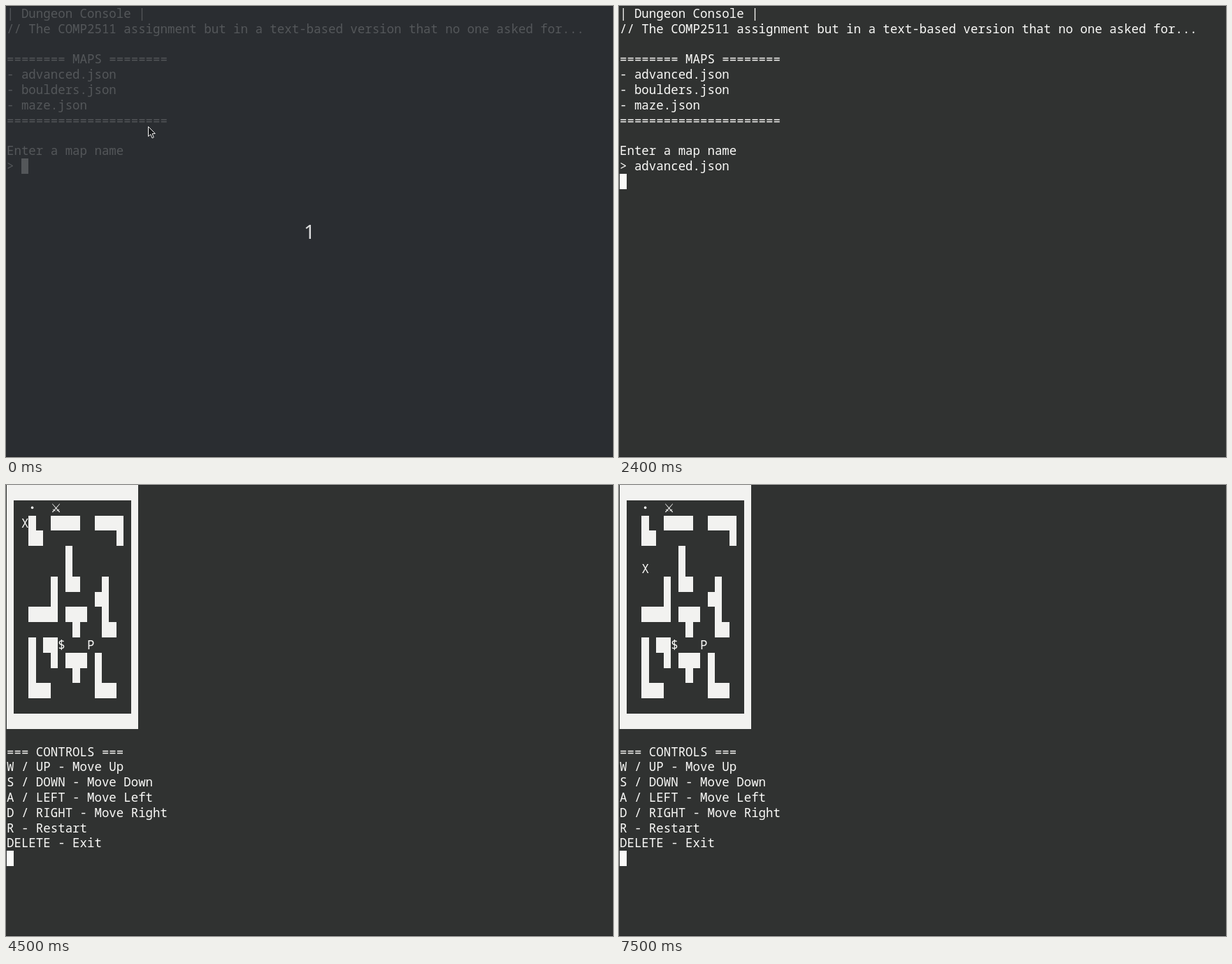
These frames come from a looping animation (868x645 px, 8000 ms). An HTML page with a canvas:

```html
<!DOCTYPE html>
<html lang="en">
<head>
<meta charset="utf-8">
<title>Dungeon Console</title>
<style>
html, body { margin: 0; width: 100%; height: 100%; overflow: hidden; background: #303231; }
canvas { display: block; }
</style>
</head>
<body>
<canvas id="stage" width="868" height="645"></canvas>
<script>
const canvas = document.getElementById('stage');
const ctx = canvas.getContext('2d');
const LOOP = 8000, TICK = 100;
const CW = 10.46, RH = 21.8, LEFT = 1;
const SIZE = CW / 0.6;
const MONO = `500 ${SIZE}px "Noto Sans Mono", "DejaVu Sans Mono", monospace`;

const MENU = `| Dungeon Console |
// The COMP2511 assignment but in a text-based version that no one asked for...

======== MAPS ========
- advanced.json
- boulders.json
- maze.json
======================

Enter a map name`.split('\n');

const CONTROLS = `=== CONTROLS ===
W / UP - Move Up
S / DOWN - Move Down
A / LEFT - Move Left
D / RIGHT - Move Right
R - Restart
DELETE - Exit`.split('\n');

const LOST = ['You lost :(', 'Press R to restart', 'or DELETE to exit'];

const MAP = `##################
#                #
#  #  ####  #### #
#  ##          # #
#       #        #
#       #        #
#     # ##   #   #
#     #     ##   #
#  #### ###  #   #
#        #   ##  #
#  # ##$   P     #
#  #  # ### #    #
#  #     #  #    #
#  ###      ###  #
#                #
##################`.split('\n');

// keystrokes, one slot per tick
const TYPED = 'a,d,,,,va,,n,ce,d,,.,,,js,,on'.split(',');
const KEYS = 'S.S.W..WD....D....A' + '.'.repeat(12) + 'R' + '.'.repeat(10) + 'DD';
const TYPE_AT = 500, ENTER_AT = 2400, GAME_AT = 2500, KEYS_AT = 3200;
const LOST_AT = 5500, RESTART_AT = KEYS_AT + KEYS.indexOf('R') * TICK;

// the cursor blinks off until the next key press
const BLINKS = [[2900, 3000], [4700, 4800], [5900, 6200], [6800, 7200]];

const STEP = { W: [0, -1], S: [0, 1], A: [-1, 0], D: [1, 0] };
const ticksSince = (start, t) => Math.max(0, Math.floor((t - start) / TICK) + 1);
const colX = c => LEFT + c * CW;

function cell(col, row, span = 1) {
  const x = Math.round(colX(col)), y = Math.round(row * RH);
  ctx.fillRect(x, y, Math.round(colX(col + span)) - x, Math.round((row + 1) * RH) - y);
}

function print(text, col, row, font = MONO) {
  ctx.font = font;
  ctx.fillText(text, colX(col), row * RH + 16.9);
}

function dot(col, row) {
  ctx.beginPath();
  ctx.arc(colX(col + 0.5), row * RH + 10.6, 1.8, 0, Math.PI * 2);
  ctx.fill();
}

function pointer(x, y) {
  const arrow = new Path2D('M.5 .5V14.5L3.8 11.6L6 16.8L8.3 15.8L6.1 10.7L10.3 10.4Z');
  ctx.save();
  ctx.translate(x, y);
  ctx.fillStyle = '#17191b';
  ctx.fill(arrow);
  ctx.strokeStyle = '#f2f2f2';
  ctx.stroke(arrow);
  ctx.restore();
}

// The enemy closes the column gap first, goes up if it cannot, and stops beside the player.
function chase(enemy, player) {
  const dx = Math.sign(player.x - enemy.x);
  const gap = Math.abs(player.x - enemy.x) + Math.abs(player.y - enemy.y);
  if (gap === 1) return;
  if (dx && MAP[enemy.y][enemy.x + dx] !== '#') enemy.x += dx;
  else enemy.y--;
}

function play(t) {
  let player, enemy;
  const reset = () => {
    player = { x: 1, y: 1 };
    enemy = { x: 3, y: 5 };
  };
  reset();
  for (const key of KEYS.slice(0, ticksSince(KEYS_AT, t))) {
    if (key === 'R') reset();
    if (!STEP[key]) continue;
    player.x += STEP[key][0];
    player.y += STEP[key][1];
    chase(enemy, player);
  }
  return { player, enemy };
}

function drawMenu(t, dim) {
  ctx.fillStyle = dim ? '#54575a' : '#fafaf8';
  MENU.forEach((line, i) => print(line, 0, i));
  const name = TYPED.slice(0, ticksSince(TYPE_AT, t)).join('');
  print('> ' + name, 0, 10);
  if (t < ENTER_AT) cell(name.length + 2, 10);
  else cell(0, 11);
  if (dim) {
    ctx.fillStyle = '#dedfdf';
    ctx.font = '28px "Noto Sans", sans-serif';
    ctx.textAlign = 'center';
    ctx.fillText('1', 434, 333);
    ctx.textAlign = 'left';
  }
  if (dim) pointer(203, 172);
  else if (t < 400) pointer(197, 166);
}

function drawGame(t) {
  ctx.fillStyle = '#f2f2f0';
  MAP.forEach((line, row) => {
    for (const wall of line.matchAll(/#+/g)) cell(wall.index, row, wall[0].length);
  });

  ctx.fillStyle = '#fafaf8';
  MAP.forEach((line, row) => {
    for (const item of line.matchAll(/[$P]/g)) print(item[0], item.index, row);
  });
  print('\u2694', 6, 1, `${SIZE}px "DejaVu Sans", sans-serif`);

  const { player, enemy } = play(t);
  dot(player.x, player.y);
  print('X', enemy.x, enemy.y);

  const lines = t >= LOST_AT && t < RESTART_AT ? LOST : CONTROLS;
  const top = MAP.length + 1;
  lines.forEach((line, i) => print(line, 0, top + i));
  if (!BLINKS.some(([off, on]) => t >= off && t < on)) cell(0, top + lines.length);
}

function frame() {
  const t = performance.now() % LOOP, dim = t < 200;
  const { width, height } = canvas;
  ctx.fillStyle = dim ? '#242629' : '#262828';
  ctx.fillRect(0, 0, width, height);
  ctx.fillStyle = dim ? '#2a2d31' : '#303231';
  ctx.fillRect(0, 1, width, height - 2);
  if (t < GAME_AT) drawMenu(t, dim);
  else drawGame(t);
  requestAnimationFrame(frame);
}
frame();
</script>
</body>
</html>
```
